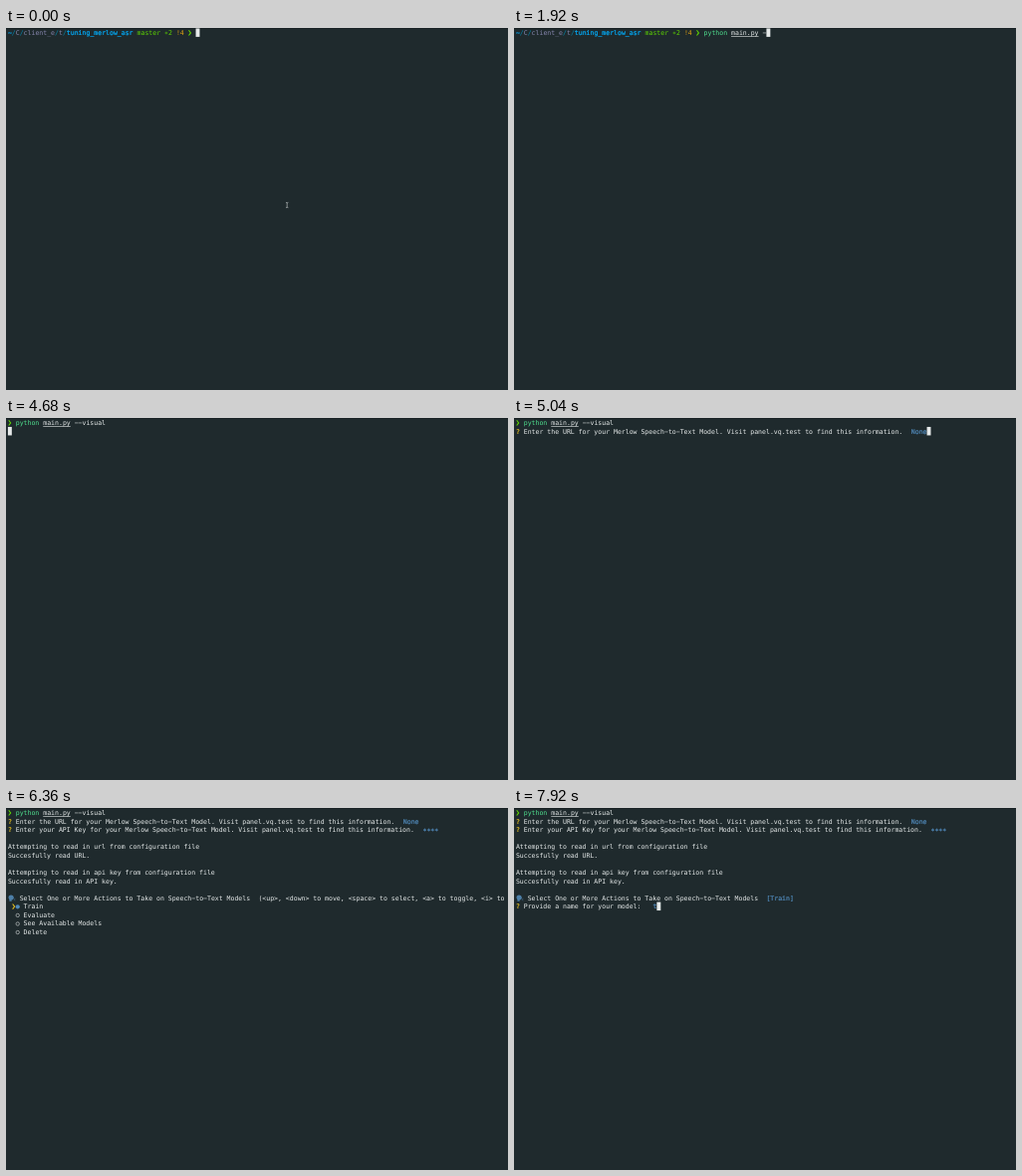
Animation of 504 by 364 pixels, one loop 8000 ms. Source, as an HTML page:

```html
<!DOCTYPE html>
<html lang="en">
<head>
<meta charset="utf-8">
<title>Terminal session</title>
<style>
html, body { margin: 0; width: 100%; height: 100%; overflow: hidden; background: #1f2a2d; }
svg { display: block; width: 100vw; height: 100vh; }
text { font: 6.528px "DejaVu Sans Mono", monospace; white-space: pre; text-rendering: geometricPrecision; }
.strong { stroke-width: 0.2px; }
</style>
</head>
<body>
<svg viewBox="0 0 504 364">
  <rect width="504" height="364" fill="#1f2a2d"/>
  <rect width="504" height="0.8" fill="#151d20"/>
  <g id="screen"></g>
</svg>
<script>
const LOOP = 8000, CW = 3.93, LH = 8.56, LEFT = 1.9;
const WHITE = "#e6eaea", GREEN = "#5fd700", MINT = "#4fe08f", AMBER = "#e8c020",
      BLUE = "#5088b8", SKY = "#00afff", SEA = "#0087af", LILAC = "#8787af", RED = "#e0483e";
const STRONG = [AMBER, BLUE, SKY];
const screen = document.getElementById("screen");

const COMMAND = "python main.py --visual";
// [time, characters typed]
const TYPING = [[360, 1], [480, 2], [600, 4], [720, 6], [840, 8], [960, 9], [1080, 11],
  [1440, 12], [1560, 13], [1680, 14], [1800, 15], [1920, 16], [2040, 17], [2160, 18],
  [2400, 20], [2520, 22], [2640, 23]];

const xAt = col => LEFT + col * CW;
const baseAt = row => row * LH + 7.2;

// Wide dashes and centred asterisks suit the terminal face
const glyphs = s => s.replace(/&/g, "&amp;").replace(/</g, "&lt;")
  .replace(/-/g, "\u2212").replace(/\*/g, "\u2217");

function text(row, col, s, fill = WHITE) {
  const weight = STRONG.includes(fill) ? ` class="strong" stroke="${fill}"` : "";
  return `<text x="${xAt(col)}" y="${baseAt(row)}" fill="${fill}"${weight}>${glyphs(s)}</text>`;
}

// Consecutive [string, colour] pieces on one row
function spans(row, col, parts) {
  return parts.map(([s, fill]) => {
    const out = text(row, col, s, fill);
    col += s.length;
    return out;
  }).join("");
}

function cursor(row, col) {
  return `<rect x="${xAt(col)}" y="${row * LH + 0.4}" width="${CW}" height="8.5" fill="${WHITE}"/>`;
}

function chevron(row, col, color) {
  return `<path d="M${xAt(col) + 0.8} ${baseAt(row) - 4.9}l2 2.6l-2 2.6" fill="none" stroke="${color}" stroke-width="1.05"/>`;
}

function bullet(row, on) {
  const at = `cx="${xAt(2.5)}" cy="${baseAt(row) - 2}"`;
  return on ? `<circle ${at} r="2.1" fill="${BLUE}"/>`
            : `<circle ${at} r="1.7" fill="none" stroke="${WHITE}" stroke-width="0.55"/>`;
}

function command(col, n) {
  const typed = COMMAND.slice(0, n), file = typed.slice(7, 14);
  let out = text(0, col, typed.slice(0, 6), n < 6 ? RED : MINT) + text(0, col + 7, typed.slice(7));
  if (file) {
    out += `<rect x="${xAt(col + 7)}" y="8.3" width="${file.length * CW}" height="0.6" fill="${WHITE}"/>`;
  }
  return out;
}

function shell(t) {
  const n = TYPING.reduce((count, [at, k]) => t >= at ? k : count, 0);
  let out = spans(0, 0, [["~", SKY], ["/", SEA], ["C", LILAC], ["/", SEA], ["client_e", LILAC],
    ["/", SEA], ["t", LILAC], ["/", SEA], ["tuning_merlow_asr", SKY], [" master", GREEN],
    [" *2", GREEN], [" !4", "#e0a010"]]);
  out += chevron(0, 46, GREEN) + command(48, n) + cursor(0, 48 + n);
  if (t < 360) {
    out += `<path d="M281 175.4q1.2 0 1.2 .8q0 -.8 1.2 -.8M282.2 176v4M281 180.7q1.2 0 1.2 -.8q0 .8 1.2 .8" fill="none" stroke="#c6cccc" stroke-width="0.6"/>`;
  }
  return out;
}

function question(row, what, answer) {
  const ask = ` Enter ${what} for your Merlow Speech-to-Text Model. Visit panel.vq.test to find this information.  `;
  return spans(row, 0, [["?", AMBER], [ask, WHITE], [answer, BLUE]]);
}

function talkingHead(row) {
  const y = baseAt(row) - 2.3;
  return `<path d="M3.4 ${y + 3.3}v-1.6q-1.6 -1.8 -.6 -3.6q2 -2.2 4.3 -.4l1 2.3l-.8 .4v1.4h-1.6v1.5z" fill="#4d7fa8"/>` +
    `<path d="M8.2 ${y + 1}l1.2 -.3M8.1 ${y + 2}l1.2 .5" stroke="#4d7fa8" stroke-width="0.5"/>`;
}

function menu(picked) {
  let out = text(10, 64, "(<up>, <down> to move, <space> to select, <a> to toggle, <i> to");
  out += chevron(11, 1, AMBER);
  ["Train", "Evaluate", "See Available Models", "Delete"].forEach((name, i) => {
    out += bullet(11 + i, i === 0 && picked) + text(11 + i, 4, name);
  });
  return out;
}

function program(t) {
  let out = chevron(0, 0, GREEN) + command(2, COMMAND.length);
  if (t < 5040) return out + cursor(1, 0);
  out += question(1, "the URL", "None");
  if (t < 5520) return out + cursor(1, 105);
  out += question(2, "your API Key", "****");
  if (t < 5760) return out + cursor(2, 110);
  out += text(4, 0, "Attempting to read in url from configuration file") +
    text(5, 0, "Succesfully read URL.") +
    text(7, 0, "Attempting to read in api key from configuration file") +
    text(8, 0, "Succesfully read in API key.");
  if (t < 5880) return out + cursor(10, 0);
  out += talkingHead(10) + text(10, 3, "Select One or More Actions to Take on Speech-to-Text Models");
  if (t < 7080) return out + menu(t >= 6360);
  out += text(10, 64, "[Train]", BLUE) +
    spans(11, 0, [["?", AMBER], [" Provide a name for your model:", WHITE]]);
  return out + (t < 7920 ? cursor(11, 35) : text(11, 35, "t", BLUE) + cursor(11, 36));
}

let shown = "";
function draw(now) {
  const t = now % LOOP;
  const next = t < 4680 ? shell(t) : program(t);
  if (next !== shown) screen.innerHTML = shown = next;
}

const start = performance.now();
function tick() {
  draw(performance.now() - start);
  requestAnimationFrame(tick);
}
tick();
</script>
</body>
</html>
```
